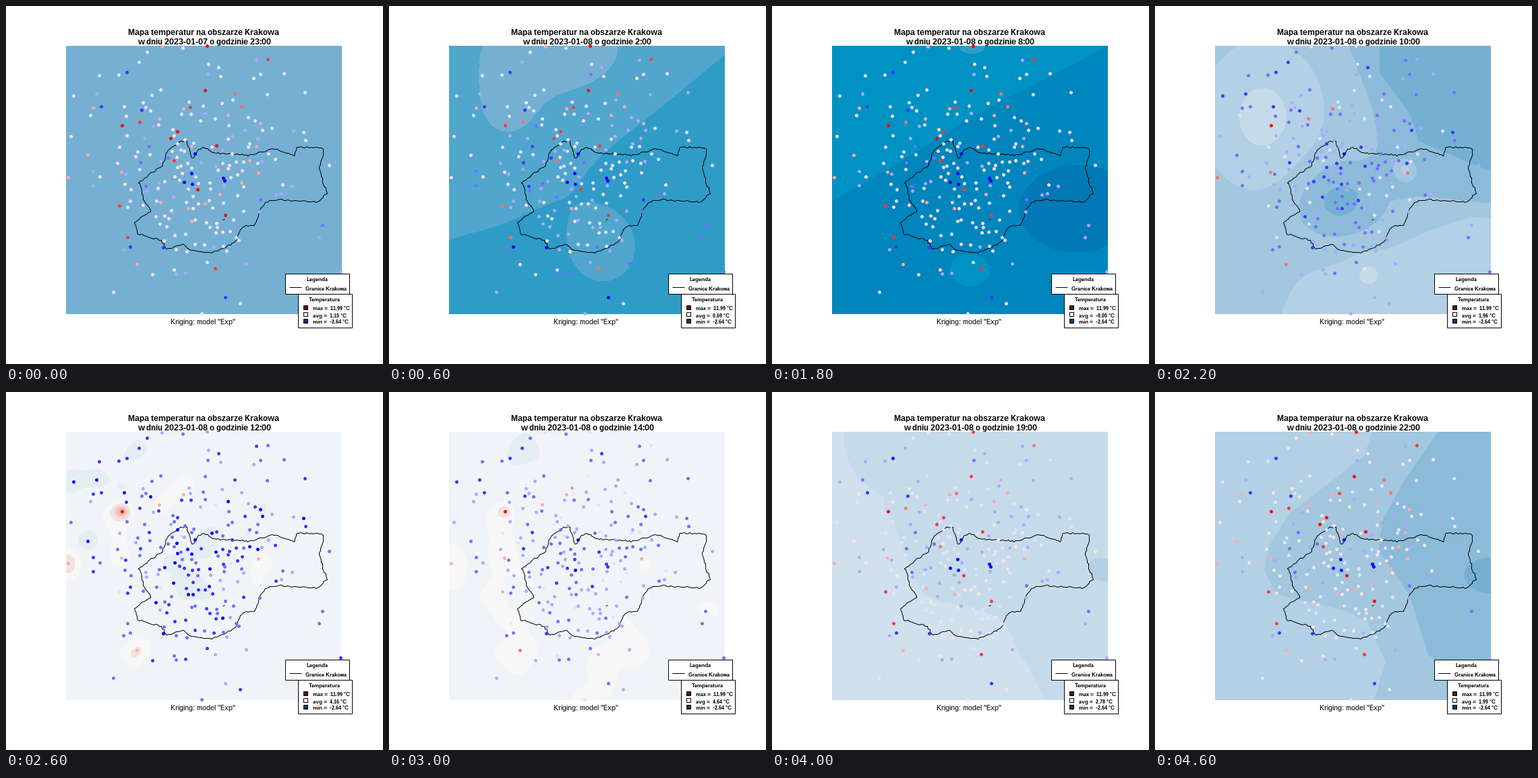
A matplotlib script for the animation above (4800 ms loop, 559x531 px).

```python
import numpy as np
import matplotlib
import matplotlib.pyplot as plt
from matplotlib.animation import FuncAnimation
from matplotlib.colors import LinearSegmentedColormap
from matplotlib.patches import Rectangle

matplotlib.rcParams.update({
    "font.family": "Liberation Sans",
    "text.hinting": "native",
    "text.hinting_factor": 1,
})

W, H, DPI = 559, 531, 64
PX = 72 / DPI                       # points per pixel
LEFT, RIGHT, TOP, BOTTOM = 89, 498, 59, 457
HOURS, N_BANDS, N_STATIONS = 24, 20, 225
rng = np.random.default_rng(8)

ramp = [(0, "#0079B6"), (2, "#0093C3"), (3, "#309DC8"), (5, "#76B1D4"),
        (7, "#A2C7DF"), (9, "#C6DBEA"), (13, "#F0F4F8"), (14, "#F9F8F8"),
        (19, "#DF9886")]
BANDS = LinearSegmentedColormap.from_list(
    "bands", [(p / 19, c) for p, c in ramp])(np.linspace(0, 1, N_BANDS))
DOTS = LinearSegmentedColormap.from_list("dots", ["blue", "white", "red"])(
    np.linspace(0, 1, 10))

# Stations that stand out; all others are scattered around the centre
HOT = [(172, 177), (295, 125), (298, 59), (254, 186), (244, 196), (312, 207),
       (284, 272), (325, 310)]
WARM = [(198, 172), (273, 150), (310, 389), (168, 296), (180, 343), (388, 79),
        (249, 229)]
SUNNY = [(92, 254), (171, 246), (194, 383), (227, 167), (263, 152), (374, 247)]
FROST = [(275, 248), (276, 264), (264, 261), (322, 255), (324, 259), (280, 219)]
CHILLY = [(141, 149), (201, 154), (179, 98), (184, 357), (233, 358), (325, 432)]

# Corners of the city border
CITY = [(197, 262), (222, 241), (231, 238), (239, 213), (252, 206), (258, 200),
        (268, 201), (276, 226), (284, 214), (292, 208), (306, 217), (360, 221),
        (399, 211), (428, 222), (430, 209), (465, 209), (471, 214), (464, 241),
        (470, 264), (476, 276), (463, 290), (404, 287), (386, 290), (377, 301),
        (369, 324), (349, 327), (341, 347), (321, 360), (300, 366), (270, 361),
        (264, 353), (238, 360), (229, 347), (196, 338), (190, 320), (215, 304),
        (204, 288), (197, 262)]


def scatter_stations(n, taken):
    spots = list(taken)
    while len(spots) < n:
        spread = (60, 75) if rng.random() < 0.6 else (115, 105)
        x, y = np.rint(rng.normal((283, 245), spread))
        near = min(np.hypot(x - a, y - b) for a, b in spots)
        if LEFT < x < RIGHT and TOP < y < BOTTOM and near > 5:
            spots.append((x, y))
    return np.array(spots) + 0.5


known = [(HOT, 9), (WARM, 8), (SUNNY, 6), (FROST, 0), (CHILLY, 1)]
fixed = [p for group, _ in known for p in group]
pos = scatter_stations(N_STATIONS, fixed)
px, py = pos.T

# Colour class of every station at night and at noon
night = 4.4 + rng.normal(0, 0.9, N_STATIONS) - ((px > 350) & (py > 270))
night[:len(fixed)] = np.repeat([c for _, c in known],
                               [len(g) for g, _ in known])
noon = np.clip(rng.normal(1.9, 1, N_STATIONS), 0, 4.4)
noon -= np.hypot(px - 278, py - 262) < 45
noon[0] = 9
noon[len(HOT + WARM):len(HOT + WARM + SUNNY)] = 6.5

X, Y = np.meshgrid(np.arange(LEFT, RIGHT) + 0.5, np.arange(TOP, BOTTOM) + 0.5)


def bump(x, y, sx, sy, amp):
    return amp * np.exp(-((X - x) / sx) ** 2 / 2 - ((Y - y) / sy) ** 2 / 2)


def late_night():
    f = 4 + 0.7 * np.tanh((470 - 0.8 * X - Y) / 80)
    return (f + bump(245, 70, 80, 48, 0.7) + bump(178, 150, 33, 38, 0.5)
            + bump(89, 390, 60, 60, -0.5) + bump(318, 358, 48, 52, 1.1))


def dawn():
    f = 2 + 0.45 * np.tanh((340 - 0.564 * X - Y) / 100)
    return (f + bump(297, 390, 35, 28, 0.75) + bump(450, 298, 90, 68, -0.9)
            + bump(297, 60, 17, 10, 1.2))


def morning():
    inner = np.interp(Y, [59, 150, 200, 280, 320], [285, 320, 335, 385, 560])
    outer = np.interp(Y, [59, 100, 160, 200, 320], [333, 333, 378, 392, 660])
    f = np.clip(7 - (X - inner) / (outer - inner), 5.5, 7.5)
    f += 0.45 + 0.45 * np.tanh((0.28 * X + Y - 440) / 40)
    return (f + bump(160, 165, 58, 72, 1.8) + bump(110, 440, 70, 70, -0.7)
            + bump(282, 285, 52, 45, -1.1) + bump(268, 292, 36, 32, -0.8)
            + bump(316, 397, 17, 17, 1) + bump(371, 243, 9, 9, 1.6))


def midday():
    total, weight = np.zeros_like(X), np.full_like(X, 0.6)
    for x, y, n in zip(px, py, noon):
        w = bump(x, y, 13, 13, 1)
        total += w * (n - 1.9) * 0.7
        weight += w
    return 13.5 + total / weight + bump(172, 177, 7, 7, 3)


def afternoon():
    edge = np.interp(X, [89, 180, 225, 260, 370, 498],
                     [168, 190, 280, 298, 293, 242])
    return 12 + 0.45 * np.tanh((Y - edge) / 40) + bump(224, 88, 50, 57, -0.9)


def evening():
    west = np.interp(Y, [59, 95, 180, 230, 265, 300, 325, 340, 400, 457],
                     [322, 310, 200, 168, 162, 180, 285, 315, 342, 325])
    east = np.interp(Y, [59, 130, 190, 235, 300, 390, 457],
                     [420, 370, 338, 331, 377, 405, 500])
    f = np.clip(8 - (X - west) / (east - west), 6.5, 8.5)
    return f + bump(500, 272, 38, 25, -0.9)


# Key hours of the day; everything between them is blended
KEYS = [0, 3, 6, 9, 11, 13, 15, 17, 23]
MEAN = [1.15, 0.69, -0.17, -0.05, 1.96, 4.16, 4.64, 3.56, 1.99]
SUN = [0, 0, 0, 0.1, 0.8, 1, 0.6, 0.15, 0]
SHIFT = [0, -0.7, 0.4, 0.2, 0.4, 0, 0, -0.3, 0]
TILT = [0, 0.4, 0, 0, -0.3, 0, -0.5, -1, 0]

cold, bright, late = dawn(), midday(), afternoon()
MAPS = [np.full_like(X, 5.5), late_night(), cold, cold, morning(), bright,
        (bright + late) / 2 + 1, late, evening()]


def surface(i):
    k = min(np.searchsorted(KEYS, i, side="right") - 1, len(KEYS) - 2)
    u = (i - KEYS[k]) / (KEYS[k + 1] - KEYS[k])
    level = MAPS[k] * (1 - u) + MAPS[k + 1] * u
    return BANDS[np.clip(level, 0, N_BANDS - 1).astype(int)]


def dot_colours(i):
    sun, shift, tilt = (np.interp(i, KEYS, v) for v in (SUN, SHIFT, TILT))
    level = night * (1 - sun) + noon * sun + shift + tilt * (258 - py) / 200
    return DOTS[np.clip(np.rint(level), 0, 9).astype(int)]


def rough(points, step=3):
    p = np.array(points, float)
    s = np.r_[0, np.cumsum(np.hypot(*np.diff(p, axis=0).T))]
    t = np.arange(0, s[-1], step)
    q = np.c_[np.interp(t, s, p[:, 0]), np.interp(t, s, p[:, 1])]
    q = np.rint(q + rng.uniform(-1, 1, q.shape)) + 0.5
    return np.r_[q, q[:1]]


fig = plt.figure(figsize=(W / DPI, H / DPI), dpi=DPI, facecolor="white")
ax = fig.add_axes([0, 0, 1, 1])


def label(x, y, s, size, weight="bold", ha="center"):
    return ax.text(x, y, s, fontsize=size * PX, weight=weight, ha=ha,
                   va="baseline", zorder=8)


def box(x, y, w, h, fill="white", z=6):
    ax.add_patch(Rectangle((x + 0.5, y + 0.5), w, h, fc=fill, ec="black",
                           lw=PX, snap=False, zorder=z))


def line(x, y, z):
    ax.plot(x, y, color="black", lw=PX, snap=False, zorder=z)


image = ax.imshow(surface(0), extent=(LEFT, RIGHT, BOTTOM, TOP),
                  interpolation="nearest", aspect="auto", zorder=1)
ax.set(xlim=(0, W), ylim=(H, 0))
ax.axis("off")

line(*rough(CITY).T, 3)
line([322, 324], [317.5, 316.5], 3)
dots = ax.scatter(px, py, s=(5 * PX) ** 2, c=dot_colours(0), linewidths=0,
                  zorder=4)

label(293, 43, "Mapa temperatur na obszarze Krakowa", 12)
when = label(294, 57, "", 12)
label(292.5, 472, 'Kriging: model "Exp"', 11, "normal")

box(414, 397, 95, 30)
label(461, 408, "Legenda", 8)
line([421, 438], [417.5, 417.5], 7)
label(444, 422, "Granice Krakowa", 8, ha="left")

box(433, 427, 80, 50)
label(472.5, 438, "Temperatura", 8)
for row, fill in enumerate(("#611300", "#F9F9F9", "#023B66")):
    box(441, 444 + 10 * row, 6, 6, fill, 7)
label(455, 451, "max =  11.99 °C", 8, ha="left")
mean = label(455, 462, "", 8, ha="left")
label(455, 471, "min =  -2.64 °C", 8, ha="left")


def draw(i):
    day = 7 if i == 0 else 8
    when.set_text(f"w dniu 2023-01-{day:02d} o godzinie {(23 + i) % 24}:00")
    mean.set_text(f"avg =  {np.interp(i, KEYS, MEAN):.2f} °C")
    image.set_data(surface(i))
    dots.set_facecolors(dot_colours(i))
    return image, dots, when, mean


anim = FuncAnimation(fig, draw, frames=HOURS, interval=200, repeat=True,
                     repeat_delay=0, blit=False)
plt.show()
```
